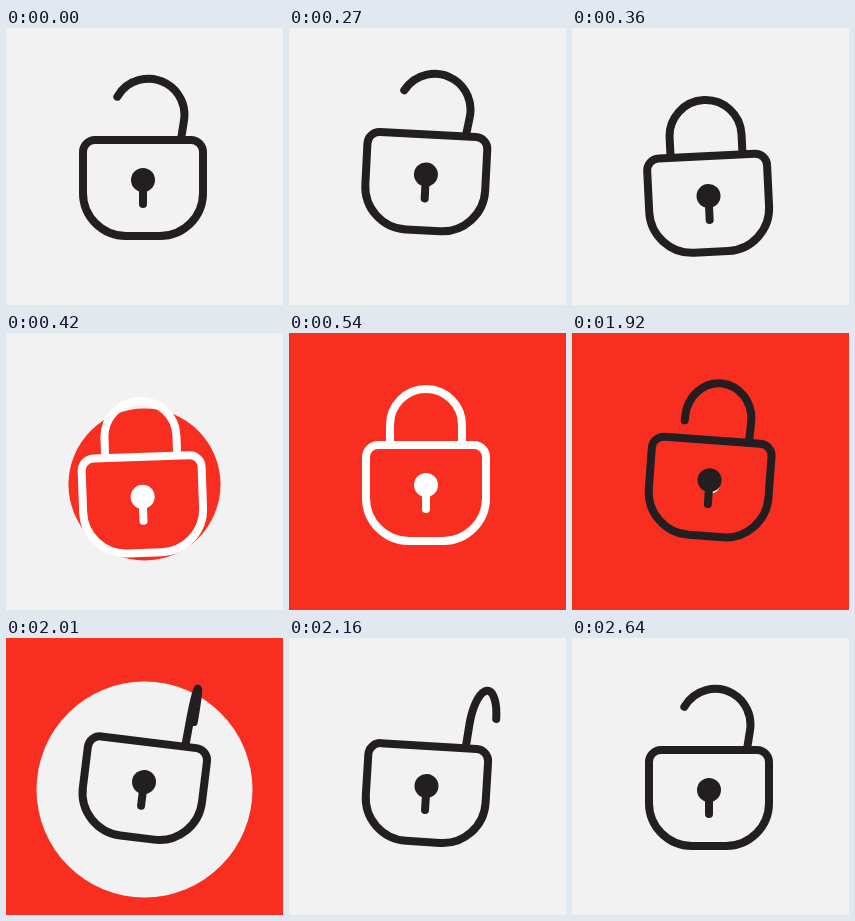
These frames come from a looping animation (277x277 px, 3.6 s). An HTML page with a canvas:

```html
<!DOCTYPE html>
<html lang="en">
<head>
<meta charset="utf-8">
<title>Padlock</title>
<style>
  html, body { margin: 0; width: 100%; height: 100%; overflow: hidden; background: #f2f2f2; }
  canvas { display: block; width: 277px; height: 277px; }
</style>
</head>
<body>
<canvas id="stage"></canvas>
<script>
const SIZE = 277, LOOP = 3600, STEP = 30;
const SLAM = 360, LOCKED = 540, UNLOCK = 1800, PEAK = 2010, SETTLED = 2310, OPEN = 2640;
const LIGHT = '#f2f2f2', RED = '#f82e21', INK = '#231f20', WHITE = '#ffffff';
const canvas = document.getElementById('stage');
const ctx = canvas.getContext('2d');
const ratio = window.devicePixelRatio || 1;
canvas.width = canvas.height = Math.round(SIZE * ratio);

const rad = deg => deg * Math.PI / 180;
const span = (t, from, to) => Math.min(1, Math.max(0, (t - from) / (to - from)));
const ease = (t, from, to) => {
  const u = span(t, from, to);
  return u * u * (3 - 2 * u);
};
// Slow start, fast middle, long tail.
const whirl = u => {
  const a = 4.85 * u ** 2.36, b = (1 - u) ** 2.36;
  return a / (a + b);
};

function pose(t) {
  const slam = ease(t, 240, SLAM);
  const hop = ease(t, 0, 120) - slam;
  const press = slam - ease(t, SLAM, LOCKED);
  const kick = ease(t, UNLOCK, PEAK) - ease(t, PEAK, SETTLED);
  const opening = t >= UNLOCK;
  const open = opening ? span(t, UNLOCK, OPEN) : 1 - slam;
  const squeeze = opening ? Math.cos(rad(350 * whirl(open))) : 1;
  return {
    x: kick - 0.5 * press,
    y: 16 * press - 9.5 * hop - 8 * kick,
    lean: 4 * hop - 2.8 * press + 7 * kick,
    squeeze,
    lift: 3.25 * (1 - squeeze),
    tilt: 9 * Math.sin(open * Math.PI / 2),
    legEnd: 79 + 33 * (1 - open) ** 4
  };
}

function disc(x, y, r, color) {
  ctx.fillStyle = color;
  ctx.beginPath();
  ctx.arc(x, y, r, 0, 2 * Math.PI);
  ctx.fill();
}

function drawShackle({ squeeze, lift, tilt, legEnd }) {
  ctx.save();
  ctx.beginPath();
  ctx.rect(-200, -200, 700, 312);
  ctx.clip();

  // The path turns about its right leg; the stroke keeps its width.
  ctx.save();
  ctx.translate(173, 124 - lift);
  ctx.rotate(rad(tilt));
  ctx.scale(squeeze, 1);
  ctx.translate(-173, -124);
  ctx.beginPath();
  if (legEnd > 92) ctx.moveTo(101, legEnd);
  ctx.arc(137, 92, 36, Math.PI + Math.asin(Math.max(0, 92 - legEnd) / 36), 2 * Math.PI);
  ctx.lineTo(173, 130);
  ctx.restore();

  ctx.stroke();
  ctx.restore();
}

function drawLock(p, color) {
  ctx.save();
  ctx.translate(137 + p.x, 152 + p.y);
  ctx.rotate(rad(p.lean));
  ctx.translate(-137, -152);
  ctx.strokeStyle = color;
  ctx.lineWidth = 8;
  ctx.lineCap = ctx.lineJoin = 'round';

  drawShackle(p);

  ctx.beginPath();
  ctx.roundRect(77, 112, 120, 96, [12, 12, 43, 43]);
  ctx.stroke();

  disc(137, 152, 12, color);
  ctx.beginPath();
  ctx.moveTo(137, 152);
  ctx.lineTo(137, 176);
  ctx.stroke();
  ctx.restore();
}

function draw(t) {
  ctx.setTransform(ratio, 0, 0, ratio, 0, 0);
  ctx.fillStyle = LIGHT;
  ctx.fillRect(0, 0, SIZE, SIZE);
  disc(138.5, 151.5, 216 * ease(t, SLAM, 510), RED);
  disc(138.5, 151.5, 216 * ease(t, 1890, 2130), LIGHT);
  drawLock(pose(t), t > SLAM && t < 1920 ? WHITE : INK);
}

const start = performance.now();
function frame() {
  const t = (performance.now() - start) % LOOP;
  draw(t - t % STEP);
  requestAnimationFrame(frame);
}
frame();
</script>
</body>
</html>
```
